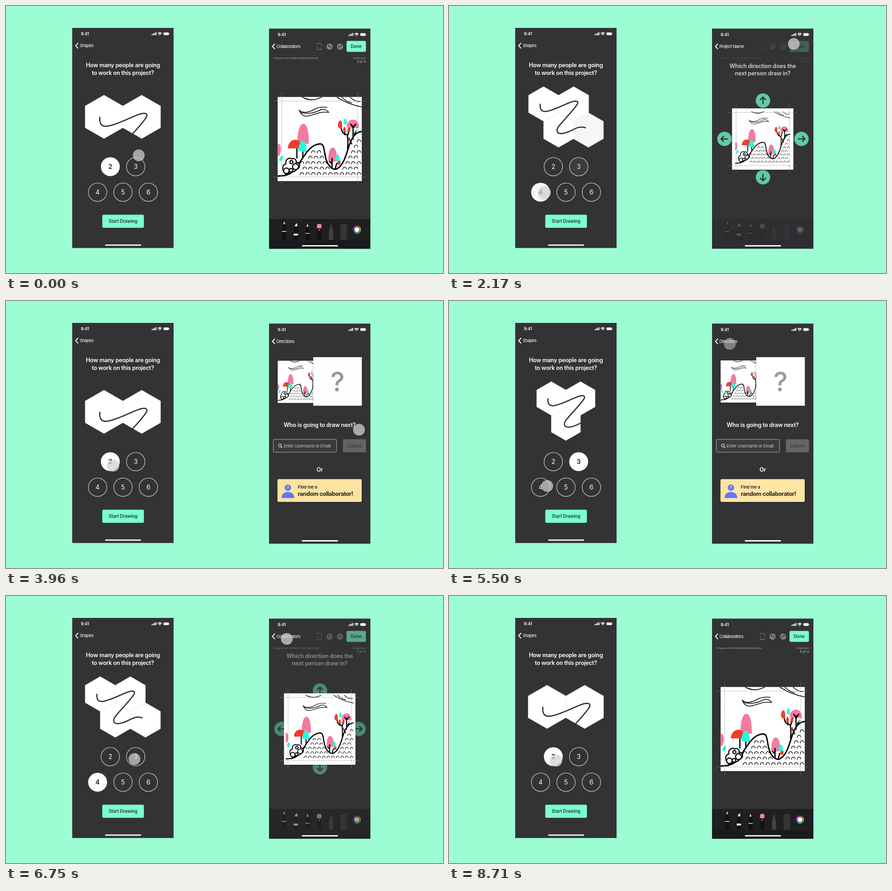
Recreate the animation shown at these times as an HTML page. Size 957 by 585 pixels, loop 8750 ms.

```html
<!DOCTYPE html>
<html lang="en">
<head>
<meta charset="utf-8">
<title>Shared drawing app</title>
<style>
html, body { margin: 0; width: 100%; height: 100%; overflow: hidden; background: #9cfdd5; }
svg { display: block; font-family: Inter, "Open Sans", sans-serif; }
.mid { text-anchor: middle; }
.end { text-anchor: end; }
.nav { font-size: 9.5px; letter-spacing: -.6px; fill: #fff; }
.head { font-size: 12.5px; font-weight: 600; letter-spacing: -.22px; fill: #fff; text-anchor: middle; }
.btn { font-size: 9.7px; font-weight: 600; letter-spacing: -.1px; fill: #333335; text-anchor: middle; }
.tiny { font-size: 5.2px; letter-spacing: -.12px; fill: #a8a8a8; }
.num { font-size: 14px; fill: #fff; text-anchor: middle; }
.on { font-weight: 700; fill: #333335; }
.ink { fill: none; stroke: #000; stroke-linecap: round; stroke-linejoin: round; }
.line { fill: none; stroke: #fff; stroke-linecap: round; stroke-linejoin: round; }
.shade { filter: drop-shadow(0 1px 2px #0005); }
</style>
</head>
<body>
<svg width="957" height="585" viewBox="0 0 957 585">
  <defs>
    <clipPath id="crop"><path d="M594.8 199.300h184.400v184.400H594.800z"/></clipPath>
    <g id="phone">
      <path fill="#333335" d="M145 48h222v482.200H145z"/>
      <text x="164" y="64.200" font-size="9" font-weight="600" fill="#fff" letter-spacing="-.1">9:41</text>
      <path stroke="#fff" stroke-width="1.900" d="M320 64v-2.500m2.800 2.500v-3.800m2.800 3.800v-5.200m2.800 5.200v-6.500"/>
      <path class="line" stroke-width="1.500" d="M332.700 59.800q4-3.600 8 0M334.300 61.600q2.400-2 4.800 0"/>
      <circle cx="336.700" cy="63.400" r="1" fill="#fff"/>
      <rect x="345" y="58" width="11.500" height="5.800" rx="1.600" fill="#fff"/>
      <path fill="#fff" d="M357 59.800h.8v2.200h-.8z"/>
      <path class="line" stroke-width="1.900" d="M157.500 81.500l-5 5.400 5 5.400"/>
      <rect x="217" y="522.500" width="79" height="2.700" rx="1.350" fill="#fff"/>
    </g>
  </defs>

  <use href="#phone"/>
  <text class="nav" x="161.500" y="90.200">Shapes</text>
  <text class="head" x="256" y="134">How many people are going</text>
  <text class="head" x="256" y="150.500">to work on this project?</text>
  <g id="hexes"></g>
  <path id="swirl" fill="none" stroke="#333335" stroke-width="2.700" stroke-linecap="round" vector-effect="non-scaling-stroke"
    d="M.39.59C.37.8.47.85.62.82C.87.77 1.16.61 1.4.52C1.62.44 1.69.5 1.6.62C1.48.8 1.2 1.08 1.02 1.3C.9 1.45.93 1.58 1.12 1.56C1.4 1.53 1.5 1.38 1.7 1.35Q1.82 1.34 1.89 1.37"/>
  <g id="buttons"></g>
  <rect x="210.800" y="457.300" width="91.200" height="28.700" rx="3" fill="#7affcd"/>
  <text class="btn" x="256.400" y="475.200">Start Drawing</text>

  <use href="#phone" x="431" y="1.600"/>
  <text class="nav" id="back" x="592" y="91.800"></text>

  <g id="draw">
    <path fill="none" stroke="#858587" d="M682 85v-3h9v4M691 92v3.500h-9V91M680.500 89h3M690 88h3"/>
    <g fill="#858587"><circle cx="708.600" cy="89" r="6.700"/><circle cx="731.600" cy="89" r="6.700"/></g>
    <path fill="none" stroke="#333335" stroke-width="1.200" d="M707.500 85l-2.300 2.300 2.300 2.200M705.500 87.300h4q2.500.3 2.300 2.500t-2.600 2.300M732.700 85l2.300 2.300-2.300 2.200M734.700 87.300h-4q-2.500.3-2.300 2.500t2.600 2.300"/>
    <rect x="745.700" y="76.600" width="42.500" height="24" rx="3" fill="#7affcd"/>
    <text class="btn" x="766.800" y="92.300">Done</text>
    <text class="tiny" x="585.300" y="116">Penguins with Sensible Knitted Waistcoats</text>
    <text class="tiny end" x="788.300" y="116">Collaborator</text>
    <text class="end" x="788.300" y="125.400" font-size="7.500" fill="#b8b8b8"><tspan font-weight="700">1</tspan> of 4</text>
    <path fill="#1f1f20" d="M576 466.700h222v65h-222z"/>
    <path fill="#1b1b1c" d="M576 513h222v18.800h-222z"/>
    <g id="tools" fill="#121213"></g>
    <path fill="#dcdcdc" d="M609.300 471.500l2 6.500h-4zM660.300 476.500l2.300 7h-4.600zM632 483l2-5 4-2v7zM604.500 493h9.600v1.800h-9.600zM630 498.500h9.600v4.500h-9.600zM655.500 497.600h9.600v1.500h-9.600z"/>
    <path fill="#f08b92" d="M681.200 487v-7q0-2.500 2.500-2.500h4.600q2.500 0 2.500 2.500v7z"/>
    <path stroke="#e7a5a8" fill="none" d="M684.500 489l3 3.500m0-3.500l-3 3.500"/>
    <path fill="#434345" d="M711.800 476l4.600 19v17h-9.200v-17z"/>
    <path fill="#363637" d="M732.500 478h15.500v34h-15.500z"/>
    <path stroke="#161616" stroke-width="4" stroke-dasharray="1 3" d="M746 481v31"/>
    <g id="wheel" fill="none" stroke-width="1.700"></g>
    <circle cx="768.500" cy="490" r="5.700" fill="#fff"/>
  </g>
  <rect x="648" y="524.100" width="79" height="2.700" rx="1.350" fill="#fff"/>

  <g id="dirs">
    <text class="head" x="687" y="135.500">Which direction does the</text>
    <text class="head" x="687" y="152">next person draw in?</text>
  </g>

  <rect id="paper" class="shade" fill="#fff"/>
  <g id="art"><g clip-path="url(#crop)">
    <g class="ink" stroke-width="1.500">
      <path d="M648 199Q668 212 692 199M655 202Q668 208 684 203M725 200Q750 216 779 221M735 199Q745 210 757 212M753 199Q765 211 776 209"/>
      <path d="M642 228C650 236 664 233 674 227Q686 220 703 222M642 228C645 236 650 243 661 241C676 239 686 230 707 233M645 233C662 238 676 234 690 227Q699 224 707 233"/>
    </g>
    <path fill="#f47a9f" d="M639 302C637 278 643 258 651 258C660 258 664 278 663 302zM706 342C705 324 709 310 715 310C722 310 726 322 725 340zM746 266C746 253 754 249 760 249C768 249 773 256 773 268zM594 302Q602 300 602 316L599 328H594z"/>
    <path class="ink" stroke-width="2.700" d="M637 312V333M650 319V331M714 334V354M714 346L709 341M724 345L721 357M748 312Q750 295 747 282Q735 281 734 266M748 284L753 268M742 276V282M760 262V292M755 259L760 267L766 259M752 292L757 302M763 280L768 273"/>
    <path fill="#ef3e2c" d="M617 312C618 299 626 293 633 293C642 293 646 297 648 309L646 312zM727 264C727 254 730 250 733 251Q737 252 736 268H730zM738 275Q738 264 742 265Q745 266 744 277zM747 276Q748 264 753 266L754 276zM725 347Q725 337 730 337Q734 339 732 348zM750 294V288Q753 285 754 292z"/>
    <path fill="#20ffdc" d="M640 318C641 303 645 295 650 295C655 296 659 306 658 320zM739 258Q740 246 744 246Q747 248 746 260zM721 338Q722 325 727 325Q732 329 731 340zM598 339Q600 327 606 328Q607 336 603 340zM766 277L767 269L770 276z"/>
    <path class="ink" stroke-width="3" d="M592 373C602 371 608 373 615 370C632 366 641 344 654 327C664 311 676 303 688 302C698 302 696 320 701 336C706 352 716 360 724 357C738 351 744 330 752 304C757 290 765 274 781 275"/>
    <g class="ink" stroke-width="2.400">
      <path fill="#fff" d="M608 363C604 353 607 347 613 346C611 336 620 331 626 335C632 332 637 338 635 343C642 341 645 350 641 355L632 362L613 369z"/>
      <circle cx="614" cy="361" r="6" fill="#fff"/><circle cx="634" cy="352" r="6.500" fill="#fff"/>
      <circle cx="625" cy="342" r="3.500"/><circle cx="624" cy="360" r="4"/>
    </g>
    <path id="tufts" class="ink" stroke-width="1.300"/>
  </g></g>
  <path id="guides" fill="none" stroke="#8f8f90" stroke-dasharray="3 2" stroke-width=".9"/>

  <g id="coll">
    <path class="shade" fill="#fff" d="M672.800 123h106.500v106.500H672.800z"/>
    <text class="mid" x="726" y="198" font-size="59" font-weight="500" fill="#99999a">?</text>
    <text class="head" x="687" y="276">Who is going to draw next?</text>
    <rect x="585.400" y="303.300" width="138.500" height="28" rx="2" fill="#3c3c3e" stroke="#b5b5b6"/>
    <path class="line" stroke-width="1.100" d="M602.200 319.200l2.800 2.800M603.100 316.500a3.200 3.200 0 1 1-6.400 0a3.200 3.200 0 1 1 6.400 0"/>
    <text x="608" y="320.800" font-size="9.500" letter-spacing="-.35" fill="#c4c4c5">Enter Username or Email</text>
    <rect x="737.800" y="303" width="50.500" height="28.600" rx="2.500" fill="#646465"/>
    <text class="btn" x="763" y="320.800" style="fill:#414143">Submit</text>
    <text class="head" x="687" y="374">Or</text>
    <rect class="shade" x="594.500" y="390.300" width="184.500" height="50" rx="3" fill="#fde5a3"/>
    <circle cx="617.300" cy="409" r="7" fill="#6279f6"/>
    <path fill="#6279f6" d="M603.500 431.800C603.500 423 609 418.500 617.300 418.500S631.300 423 631.300 431.800z"/>
    <text class="mid" x="617.300" y="412.200" font-size="8.500" font-weight="700" fill="#fff">?</text>
    <text x="639" y="411.200" font-size="9.500" font-weight="600" letter-spacing="-.2" fill="#242426">Find me a</text>
    <text x="639" y="427" font-size="12.600" font-weight="700" letter-spacing="-.4" fill="#242426">random collaborator!</text>
  </g>

  <circle id="tapL" class="shade" r="13" fill="#d2d2d2" opacity=".72"/>
  <circle id="tapR" class="shade" r="13" fill="#d2d2d2"/>
</svg>
<script>
const $ = id => document.getElementById(id);
const set = (el, attrs) => { for (const k in attrs) el.setAttribute(k, attrs[k]); };
const make = (parent, tag, attrs, text = '') => {
  const el = parent.appendChild(document.createElementNS('http://www.w3.org/2000/svg', tag));
  set(el, attrs);
  el.textContent = text;
  return el;
};
const mix = (a, b, p) => a.map((v, i) => v + (b[i] - v) * p);
const clamp = u => Math.max(0, Math.min(1, u));
const smooth = u => (u = clamp(u), u * u * (3 - 2 * u));
const easeOut = u => 1 - (1 - clamp(u)) ** 3;
const place = ([x, y, s]) => `translate(${x} ${y}) scale(${s})`;
const LOOP = 8750;

// Hexagon layouts by number of people: x, y, width of one cell
const layout = { 2: [173.3, 195.2, 82.6], 3: [192, 176.5, 64], 4: [173.3, 176.5, 66] };
const rowStep = Math.sqrt(3) / 2;
const cells = [0, 1, 2, 3].map(i => {
  const row = i >> 1;
  return [i % 2 + row / 2, row * rowStep];
});
const hexes = cells.map(() => make($('hexes'), 'polygon', {
  points: '.5,0 1,.2887 1,.866 .5,1.1547 0,.866 0,.2887',
  fill: '#fff', stroke: '#f0f0f0', 'stroke-width': .5, 'vector-effect': 'non-scaling-stroke'
}));

const fills = {};
for (let n = 2; n <= 6; n++) {
  const top = n < 4, box = $('buttons');
  const x = 256.2 + (n - (top ? 2.5 : 5)) * 55.6, y = top ? 352 : 408;
  make(box, 'circle', { cx: x, cy: y, r: 20.2, fill: 'none', stroke: '#c9c9ca', 'stroke-width': 1.3 });
  make(box, 'text', { x, y: y + 5, class: 'num' }, n);
  fills[n] = make(box, 'g', {});
  make(fills[n], 'circle', { cx: x, cy: y, r: 20.3, fill: '#fff' });
  make(fills[n], 'text', { x, y: y + 5, class: 'num on' }, n);
}

for (let i = 0; i < 4; i++) {
  const turn = i * Math.PI / 2;
  const g = make($('dirs'), 'g', {
    transform: `translate(${687.6 + 84.3 * Math.cos(turn)} ${291.2 + 84 * Math.sin(turn)}) rotate(${i * 90})`
  });
  make(g, 'circle', { r: 15.8, fill: '#6ef8c5' });
  make(g, 'path', { d: 'M-7.5 0H7.5M1.5-6.2L7.5 0L1.5 6.2', fill: 'none', stroke: '#333335', 'stroke-width': 2.6 });
}

for (let i = 0; i < 4; i++)
  make($('tools'), 'path', { d: `M${607 + i * 25.6} 477h4.600l2.500 15v20h-9.600v-20z` });

for (let a = 0; a < 360; a += 15)
  make($('wheel'), 'path', {
    d: 'M0-7.800A7.800 7.800 0 0 1 2.300-7.450', stroke: `hsl(${a} 85% 60%)`,
    transform: `translate(768.5 490) rotate(${a})`
  });

// Grass tufts: staggered rows wherever there is hill above
const ridge = x => x < 688 ? 303 + .02 * (x - 685) ** 2
  : x < 711 ? 303 + .1 * (x - 688) ** 2 : 357 - 1.5 * (x - 722);
let grass = '';
for (let y = 295, row = 0; y < 370; y += 12, row++)
  for (let x = 648 + row % 2 * 6; x < 778; x += 12.5)
    if (y > ridge(x) + 9) grass += `M${x - 4} ${y + 3}q1-6 5-5q3 1 3 4`;
$('tufts').setAttribute('d', grass);

// Right-hand views: centre x, centre y, drawing scale, half size of the paper
const views = [[687, 291.5, 1, 92.2], [687, 291.5, .555, 60], [641, 176.4, .5, 46.2]];
const labels = ['Collaborators', 'Project Name', 'Directions'];

// Each step is a tap at a point that leads to the next state
const finger = { 2: [235, 361], 3: [283, 356], 4: [210, 409] };
const people = [[300, 3], [1900, 4], [3270, 2], [4850, 3], [5640, 4], [6850, 3], [7950, 2]]
  .map(([start, next]) => ({ start, next, dur: 420, at: finger[next] }));
const screens = [
  { start: 1920, next: 1, dur: 640, at: [755, 83] },
  { start: 3700, next: 2, dur: 320, at: [773, 282] },
  { start: 5540, next: 1, dur: 600, at: [615, 94] },
  { start: 6595, next: 0, dur: 640, at: [615, 94] }
];

function stateAt(steps, first, t) {
  let from = first, to = first, p = 1;
  for (const step of steps) {
    if (t < step.start) break;
    from = to;
    to = step.next;
    p = easeOut((t - step.start) / step.dur);
  }
  return [from, to, p];
}

// The pointer sets off a fixed lead time before each tap
function moveTap(el, steps, origin, lead, t) {
  const [cx, cy] = steps.reduce((pos, s) => mix(pos, s.at, smooth((t - s.start + lead) / 550)), origin);
  set(el, { cx, cy });
}

function drawLeft(t) {
  const [from, to, p] = stateAt(people, 2, t);
  // A cell that is absent from one layout keeps its place in the other
  const cellLayout = min => mix(
    layout[from < min ? Math.max(to, min) : from],
    layout[to < min ? Math.max(from, min) : to], p);
  hexes.forEach((hex, i) => {
    const [x, y, s] = cellLayout(Math.max(2, i + 1)), [cx, cy] = cells[i];
    set(hex, {
      transform: place([x + cx * s, y + cy * s, s]),
      opacity: (from > i) * (1 - p) + (to > i) * p
    });
  });
  set($('swirl'), { transform: place(cellLayout(2)) });
  for (const n in fills) set(fills[n], { opacity: (from == n) * (1 - p) + (to == n) * p });
  moveTap($('tapL'), people, [301, 289], 600, t);
}

function drawRight(t) {
  const [from, to, p] = stateAt(screens, 0, t);
  const weight = i => (from == i) * (1 - p) + (to == i) * p;
  ['draw', 'dirs', 'coll'].forEach((id, i) => set($(id), { opacity: weight(i) }));
  $('back').textContent = labels[to];
  const [x, y, s, h] = mix(views[from], views[to], p);
  set($('paper'), { x: x - h, y: y - h, width: 2 * h, height: 2 * h });
  set($('art'), { transform: place([x, y, s]) + ' translate(-687 -291.5)' });
  const off = h - 9, len = 2 * h + 17, a = h + 8.5;
  set($('guides'), {
    opacity: 1 - weight(2),
    d: [-off, off].map(o => `M${x + o} ${y - a}v${len}M${x - a} ${y + o}h${len}`).join('')
  });

  const press = Math.max(...screens.map(s => Math.exp(-(((t - s.start + 120) / 130) ** 2))));
  const shown = smooth((t - 1000) / 250) - smooth((t - 6850) / 300);
  set($('tapR'), { opacity: shown * (.74 - .36 * press) });
  moveTap($('tapR'), screens, [762, 125], 1200, t);
}

const begin = performance.now();
function frame() {
  const t = (performance.now() - begin) % LOOP;
  drawLeft(t);
  drawRight(t);
  requestAnimationFrame(frame);
}
frame();
</script>
</body>
</html>
```
